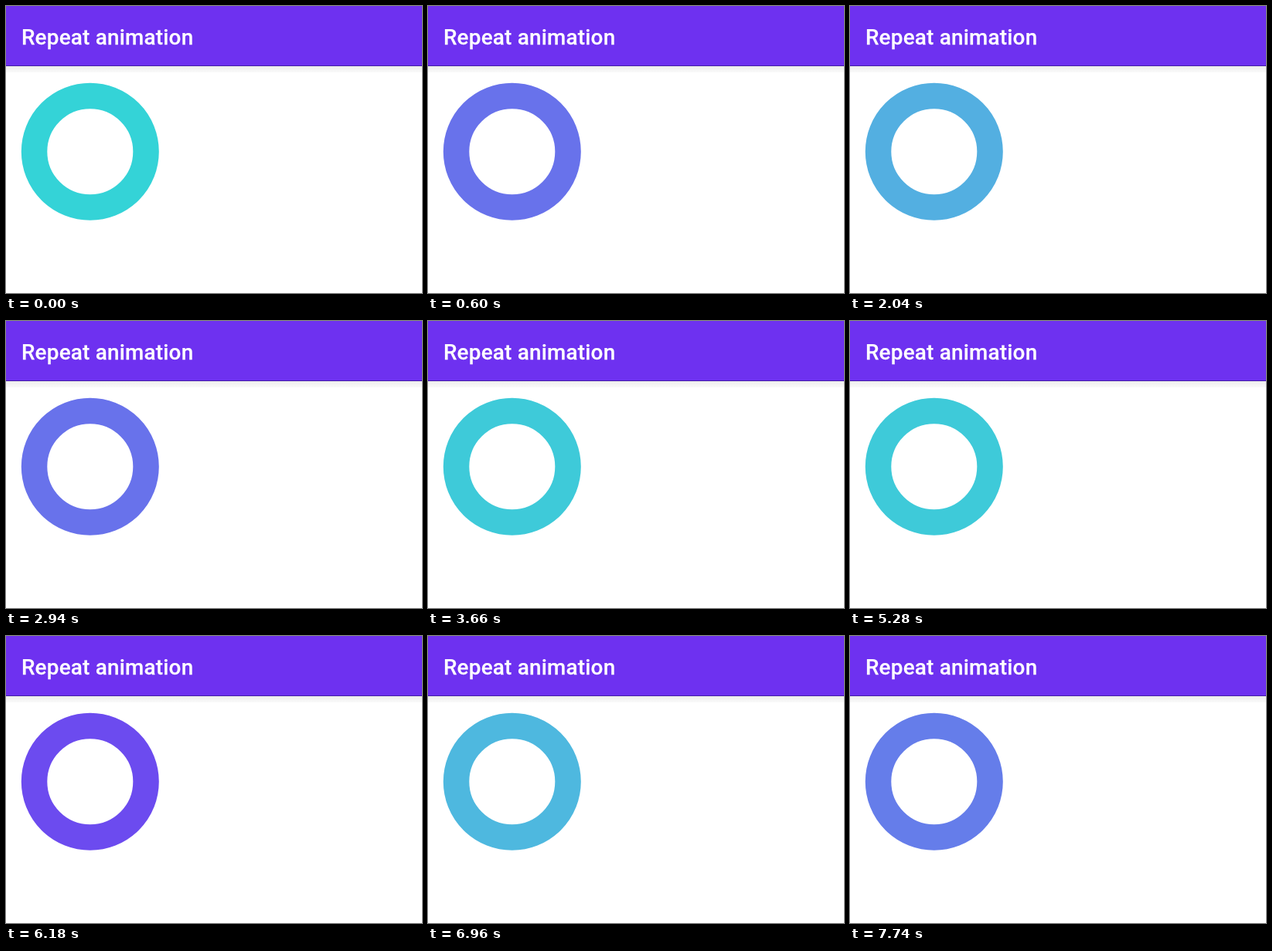
Animation of 538x372 px, one loop 7.8 s. Source, as an HTML page:

```html
<!DOCTYPE html>
<html lang="en">
<head>
<meta charset="utf-8">
<title>Repeat animation</title>
<style>
  html, body { margin: 0; width: 100%; height: 100%; overflow: hidden; background: #fff; }
  svg { display: block; }
  text {
    font: 500 27.85px Roboto, sans-serif;
    letter-spacing: .21px;
    fill: #fff;
    stroke: #fff;
    stroke-width: .25px;
  }
</style>
</head>
<body>
<svg width="538" height="372" viewBox="0 0 538 372">
  <defs>
    <linearGradient id="shade" x2="0" y2="1">
      <stop stop-color="#ededed"/>
      <stop offset="1" stop-color="#fafafa"/>
    </linearGradient>
  </defs>
  <rect y="78" width="538" height="8" fill="url(#shade)"/>
  <rect width="538" height="78" fill="#6e31f0"/>
  <rect y="77" width="538" height="1" fill="#431ba8"/>
  <text x="20" y="50">Repeat animation</text>
  <circle id="ring" cx="108.8" cy="188.8" r="72.25" fill="none" stroke-width="33.5"/>
</svg>
<script>
const LOOP = 7800, STEP = 60, HALF = 900;
const TEAL = 'rgb(45 216 213)', VIOLET = 'rgb(110 49 240)';
const ring = document.getElementById('ring');

// Linear fade to violet and back, held for each step
function draw(time) {
  const t = (Math.floor(time % LOOP / STEP) + 0.5) * STEP;
  const phase = t / HALF % 2;
  const violet = 100 * (1 - Math.abs(1 - phase));
  ring.style.stroke = `color-mix(in oklab, ${VIOLET} ${violet.toFixed(2)}%, ${TEAL})`;
}

const start = performance.now();
function tick() {
  draw(performance.now() - start);
  requestAnimationFrame(tick);
}
tick();
</script>
</body>
</html>
```
